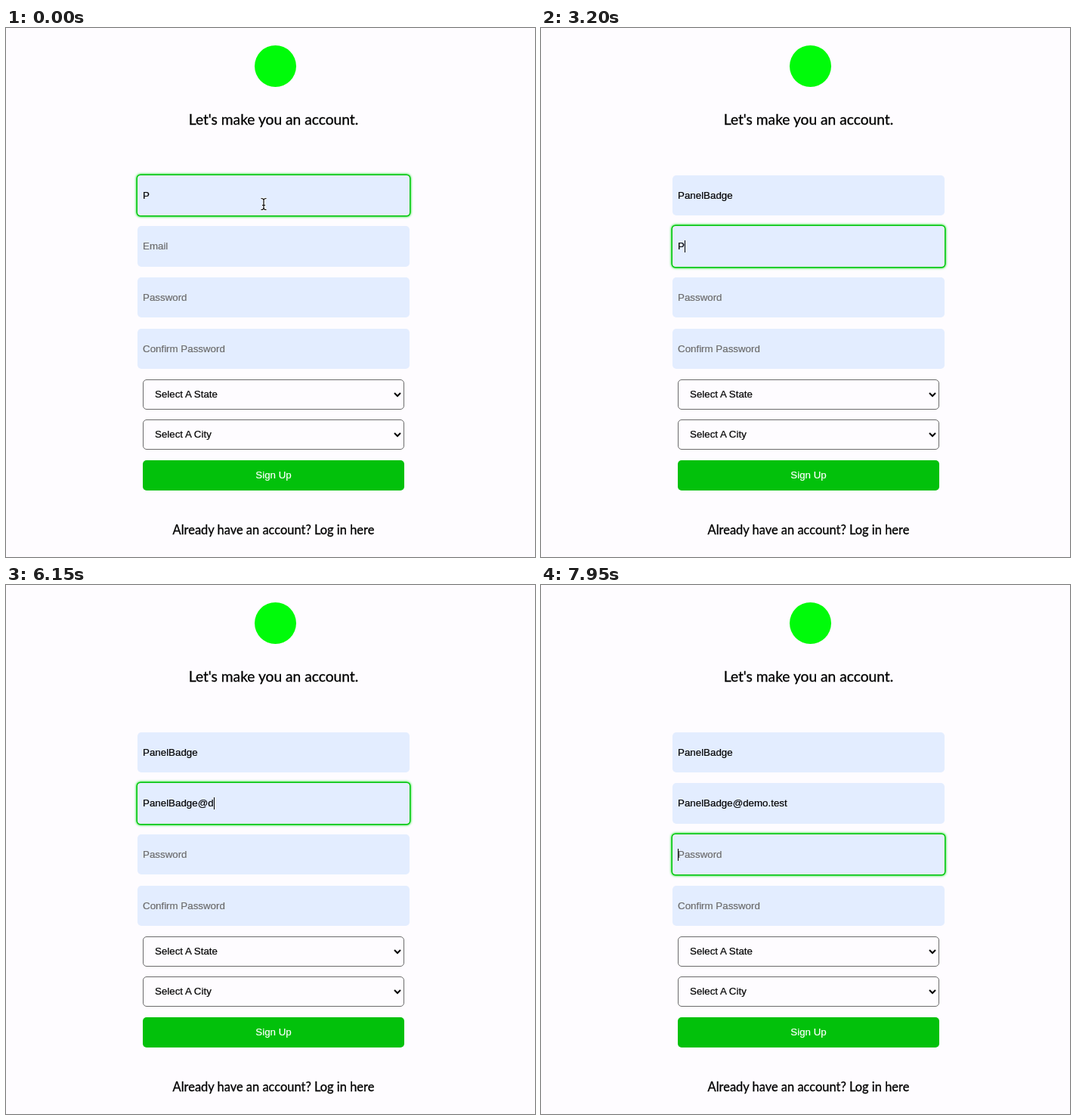
An HTML page for the animation above (8 s loop, 700x700 px).

```html
<!DOCTYPE html>
<html lang="en">
<head>
<meta charset="utf-8">
<title>Sign up form</title>
<style>
  html, body { margin: 0; width: 100%; height: 100%; overflow: hidden; background: #fefcff; }
  body { font: 13.333px "Liberation Sans", Arial, sans-serif; color: #000; -webkit-text-stroke: .2px; }
  div { position: absolute; box-sizing: border-box; white-space: pre; }
  .logo { left: 329px; top: 23px; width: 55px; height: 55px; border-radius: 50%; background: #00fb0a; }
  .line { left: 54px; width: 600px; height: 30px; line-height: 30px; text-align: center; font-family: Lato, sans-serif; -webkit-text-stroke: .3px; }
  .field { left: 174px; width: 360px; height: 53.5px; line-height: 53.5px; padding-left: 7px; border-radius: 5px; background: #e3edff; }
  .ring { inset: 0; border-radius: 4px; box-shadow: 0 0 0 1.5px #06c412, 0 0 3px 2px #2ee63a; }
  .caret { top: 19px; width: 1px; height: 16px; background: #000; }
  .select { left: 181px; width: 346px; height: 39.5px; line-height: 37.5px; padding-left: 15px; border: 1px solid #6b6b6b; border-radius: 5px; }
  .select svg { position: absolute; right: 2px; top: 15px; }
  .button { left: 181px; top: 572px; width: 346px; height: 40px; line-height: 40px; border-radius: 5px; background: #02c10b; color: #fff; text-align: center; }
  #mouse { position: absolute; left: 335px; top: 224px; }
</style>
</head>
<body>
<div class="logo"></div>
<div class="line" style="top:105.5px;font-size:19.2px">Let's make you an account.</div>
<div class="select" style="top:465px">Select A State<svg width="12" height="9"><path id="chevron" d="M2 2l4 4 4-4" fill="none" stroke="#000" stroke-width="2"/></svg></div>
<div class="select" style="top:518.4px">Select A City<svg width="12" height="9"><use href="#chevron"/></svg></div>
<div class="button">Sign Up</div>
<div class="line" style="top:649px;font-size:16.45px">Already have an account? Log in here</div>
<svg id="mouse" width="12" height="18" fill="none">
  <defs><path id="beam" d="M2.5 1.5Q6 1.5 6 4V14Q6 16.5 2.5 16.5M9.5 1.5Q6 1.5 6 4M6 14Q6 16.5 9.5 16.5M4 10.5H8"/></defs>
  <use href="#beam" stroke="#fff" stroke-width="3"/>
  <use href="#beam" stroke="#000" stroke-width="1.2"/>
</svg>
<script>
const LOOP = 8000, FADE = 250;
const user = 'PanelBadge';
const specs = [
  { hint: 'Username', text: user, focus: -2000, blur: 2450,
    keys: [-800, 200, 350, 500, 600, 1400, 1500, 1650, 1750, 1850] },
  { hint: 'Email', text: user + '@demo.test', focus: 2450, blur: 7600,
    keys: [2950, 3300, 3450, 3600, 3750, 4100, 4300, 4500, 4700, 4900,
           5650, 6050, 6300, 6550, 6800, 7050, 7150, 7250, 7350, 7450] },
  { hint: 'Password', text: '', focus: 7600, blur: 9999, keys: [] },
  { hint: 'Confirm Password', text: '', focus: 9999, blur: 9999, keys: [] }
];

function add(parent, tag, className) {
  const el = document.createElement(tag);
  el.className = className;
  return parent.appendChild(el);
}

const fields = specs.map((spec, i) => {
  const box = add(document.body, 'div', 'field');
  box.style.top = 194.7 + i * 67.6 + 'px';
  const ring = add(box, 'div', 'ring');
  const label = add(box, 'span', 'label');
  const caret = add(box, 'div', 'caret');
  return { ...spec, ring, label, caret };
});
const mouse = document.getElementById('mouse');
document.body.append(mouse);

function drawField(f, t) {
  const typed = f.keys.filter(k => k <= t).length;
  const focused = t >= f.focus && t < f.blur;
  const text = f.text.slice(0, typed) || f.hint;
  if (f.label.textContent !== text) f.label.textContent = text;
  f.label.style.color = typed ? '#000' : '#6c6c6c';

  const p = Math.min(1, (t - f.focus) / FADE);
  f.ring.style.opacity = focused ? 1 - (1 - p) ** 2 : 0;

  // The caret restarts its blink after every key.
  const last = typed ? f.keys[typed - 1] : f.focus;
  f.caret.style.opacity = focused && (t - last) % 1000 < 500 ? 1 : 0;
  f.caret.style.left = 7 + (typed ? f.label.getBoundingClientRect().width : 0) + 'px';
}

function frame(now) {
  const t = now % LOOP;
  fields.forEach(f => drawField(f, t));
  mouse.style.display = t < 50 ? '' : 'none';
  requestAnimationFrame(frame);
}
frame(0);
</script>
</body>
</html>
```
